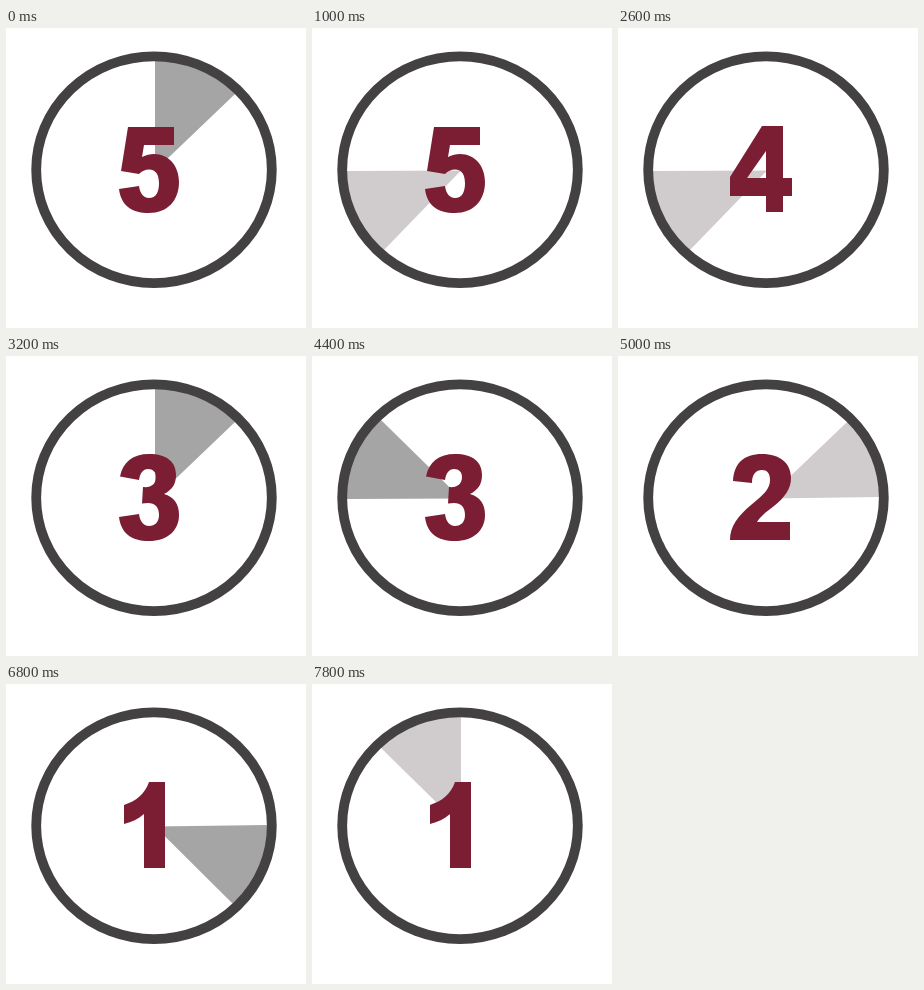
Write an HTML page that moves like this. It is 300 by 300 pixels and loops after 8 s.

```html
<!DOCTYPE html>
<html lang="en">
<head>
<meta charset="utf-8">
<title>Countdown</title>
<style>
  html, body { margin: 0; width: 100%; height: 100%; overflow: hidden; background: #fff; }
  svg { display: block; width: 300px; height: 300px; }
</style>
</head>
<body>
<svg viewBox="0 0 300 300" role="img" aria-label="5">
  <clipPath id="face"><ellipse cx="148" cy="141.7" rx="114" ry="109.5"/></clipPath>
  <path id="wedge" clip-path="url(#face)"/>
  <ellipse cx="148" cy="141.7" rx="117.8" ry="113.4" fill="none" stroke="#434142" stroke-width="9.8"/>
  <path id="digit" fill="#7b1e34" fill-rule="evenodd"/>
</svg>
<script>
const STEP = 200, SECTORS = 8;
const svg = document.querySelector('svg');
const wedge = document.getElementById('wedge');
const digit = document.getElementById('digit');

// Heavy numeral outlines, counted down from 5 to 1
const numerals = [
  'M122 99H168V117H138L136 129C140 127 144 126 148 126C163 126 173 138 173 154C173 173 161 185 143 185C125 185 115 177 113 161L133 158C134 166 138 170 143 170C150 170 153 164 153 155.5C153 147 150 141.5 143 141.5C139 141.5 136 143 133 146L115 143Z',
  'M144 98H165V150H174V168H165V184H148V168H112V149ZM148 150V123L129 150Z',
  'M133 124L114 120.5C117 106 127 98 143 98C161 98 170 106 170 119C170 128 166 134 158 138C168 141 173 148 173 159C173 175 161 185 143 185C125 185 115 177 113 161L133 158C134 166 138 170 143 170C149 170 153 166 153 159C153 151 149 147 142 147L136 147.5L137 131C145 132 150 128 150 121C150 116 147 113 142 113C137 113 134 117 133 124Z',
  'M134 127L115 125C116 107 126 98 144 98C162 98 173 107 173 122C173 133 167 141 156 150C148 156 143 160 139 166H172V184H112C112 170 120 160 133 149C147 138 152 132 152 124C152 117 149 114 144 114C138 114 134 118 134 127Z',
  'M143 98H159V184H138V130C132 135 126 138 118 140V121C130 117 139 110 143 98Z'
];

// Sector borders on the rim, clockwise from the top
const hub = [149, 142.5];
const rim = [[149, 33], [229, 66], [261, 141], [227, 220], [149, 251], [72, 222], [35, 143], [69, 64]];

// Extends a border past the rim so that the clip shapes its end
const reach = i => rim[i % SECTORS].map((v, k) => hub[k] + (v - hub[k]) * 1.5);

let shown = -1;
function draw(now) {
  const tick = Math.floor(now / STEP) % (SECTORS * numerals.length);
  if (tick !== shown) {
    shown = tick;
    const turn = Math.floor(tick / SECTORS), sector = tick % SECTORS;
    wedge.setAttribute('d', `M${hub}L${reach(sector)}L${reach(sector + 1)}Z`);
    wedge.setAttribute('fill', sector % 2 ? '#d0cccd' : '#a5a5a5');
    digit.setAttribute('d', numerals[turn]);
    svg.setAttribute('aria-label', numerals.length - turn);
  }
  requestAnimationFrame(() => draw(performance.now()));
}
draw(performance.now());
</script>
</body>
</html>
```
